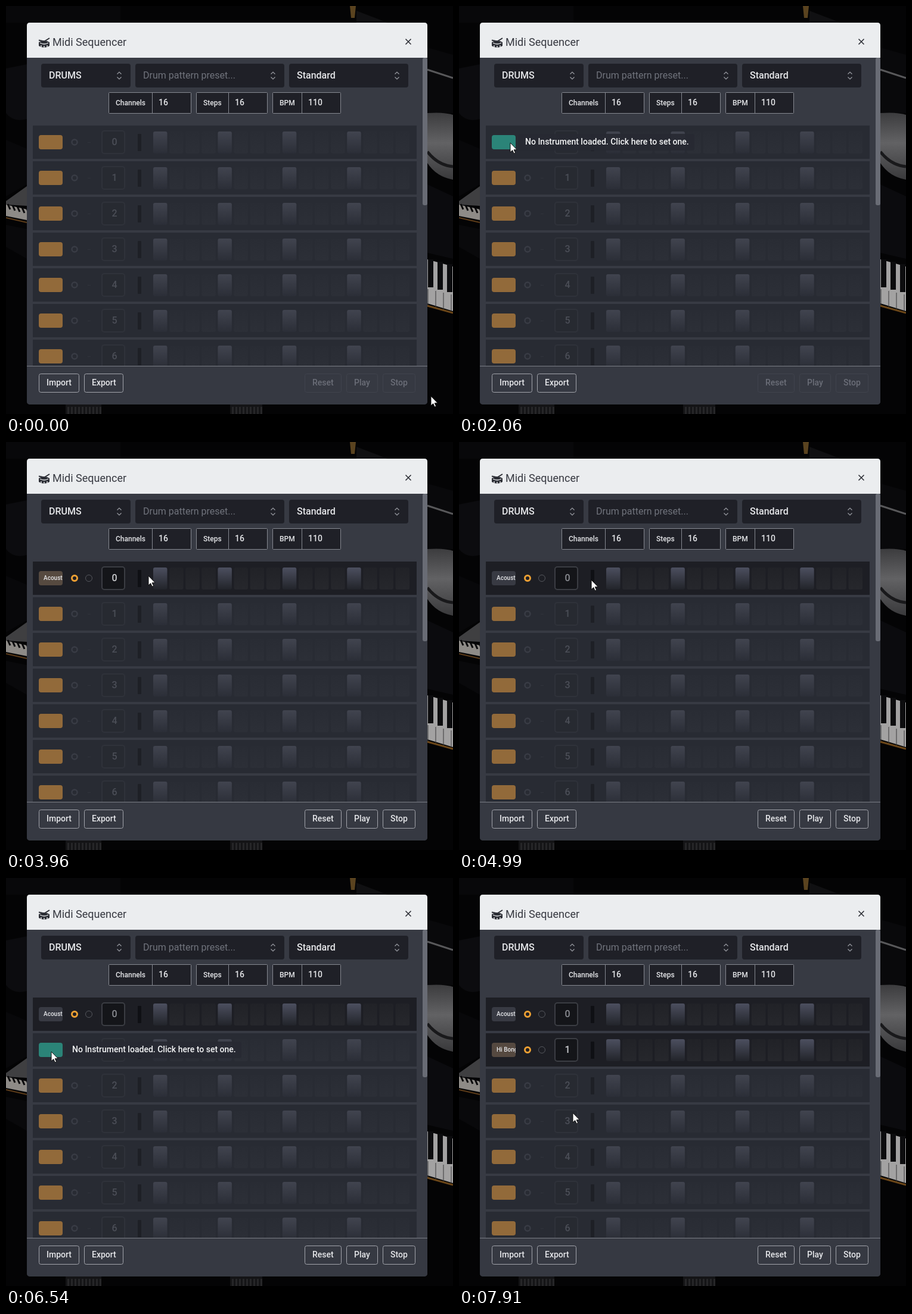
An HTML page that plays this animation: 750x686 px, repeating every 8000 ms.

```html
<!DOCTYPE html>
<html lang="en">
<head>
<meta charset="utf-8">
<title>Midi Sequencer</title>
<style>
html, body { margin: 0; width: 100%; height: 100%; overflow: hidden; background: #040405; }
svg { font-family: Roboto, sans-serif; }
#stage { display: block; width: 100vw; height: 100vh; }
</style>
</head>
<body>
<svg id="stage" viewBox="0 0 750 686">
  <defs>
    <linearGradient id="beatOn" x2="0" y2="1"><stop stop-color="#4c4f5f"/><stop offset="1" stop-color="#22242a"/></linearGradient>
    <linearGradient id="beatOff" x2="0" y2="1"><stop stop-color="#41444f"/><stop offset="1" stop-color="#2b2e37"/></linearGradient>
    <linearGradient id="padOn" x2="0" y2="1"><stop stop-color="#212227"/><stop offset="1" stop-color="#26272c"/></linearGradient>
    <linearGradient id="padOff" x2="0" y2="1"><stop stop-color="#292c34"/><stop offset="1" stop-color="#2c2f37"/></linearGradient>
    <linearGradient id="lamp" x2="0" y2="1"><stop stop-color="#3c3c3e"/><stop offset=".45" stop-color="#626264"/><stop offset="1" stop-color="#39393b"/></linearGradient>
  </defs>
  <g id="room"></g>
  <g id="scene"></g>
</svg>
<script>
const LOOP = 8000, STEP = 172;
const ORANGE = '#926a3a', BODY = '#373a43', HEADER = '#ebedef', INK = '#2c2e35', PALE = '#e6e7ea';
const dialogs = [{ open: 2400, close: 3950, row: 0 }, { open: 6700, close: 7900, row: 1 }];
const labels = ['Acoustic Bass Drum', 'Hi Bongo'];
const instruments = [
  ['Acoustic Bass Drum', 35], ['Ride Cymbal 2', 59], ['Bass Drum 1', 36], ['Hi Bongo', 60],
  ['1 Side Stick', 37], ['3 Low Bongo', 61], ['Acoustic Snare', 38], ['Mute Hi Conga', 62], ['Hand Clap', 39]
];
// Pointer path: time, x, y
const pointerPath = [
  [0, 713, 656], [1200, 716, 490], [1548, 86, 230], [2408, 86, 230], [2920, 231, 229], [3270, 239, 226],
  [3960, 239, 225], [4816, 239, 225], [5676, 76, 292], [6880, 76, 292], [7568, 197, 395], [7910, 191, 395], [8000, 191, 395]
];

const clamp = v => Math.max(0, Math.min(1, v));
const repeat = (n, draw) => Array.from({ length: n }, (_, i) => draw(i)).join('');
const mix = (a, b, k) => `rgb(${a.map((v, i) => Math.round(v + (b[i] - v) * k))})`;
const rect = (x, y, w, h, fill, r = 0, extra = '') =>
  `<rect x="${x}" y="${y}" width="${w}" height="${h}" rx="${r}" fill="${fill}" ${extra}/>`;
const frame = (x, y, w, h, stroke, fill = 'none', r = 3, line = 1) =>
  rect(x + line / 2, y + line / 2, w - line, h - line, fill, r, `stroke="${stroke}" stroke-width="${line}"`);
const text = (x, y, str, size, fill = PALE, weight = 500, extra = '') =>
  `<text x="${x}" y="${y}" font-size="${size}" fill="${fill}" font-weight="${weight}" ${extra}>${str}</text>`;
const line = (d, stroke, width = 1, extra = '') =>
  `<path d="${d}" fill="none" stroke="${stroke}" stroke-width="${width}" ${extra}/>`;
const shape = (d, fill, extra = '') => `<path d="${d}" fill="${fill}" ${extra}/>`;
const ring = (x, y, r, stroke, width, fill = 'none') =>
  `<circle cx="${x}" cy="${y}" r="${r}" fill="${fill}" stroke="${stroke}" stroke-width="${width}"/>`;
const closeIcon = (x, y) => line(`M${x - 4.5} ${y - 4.5}l9 9m0-9l-9 9`, INK, 1.6);

function drawRoom() {
  return rect(0, 0, 750, 686, '#040405') +
    rect(0, 0, 192, 28, '#08080a') +
    shape('M0 105L35 98V190Q12 196 0 180Z', '#0c0c0f') +
    shape('M0 225L35 240V300L0 320Z', '#08080a') +
    shape('M0 328L35 303V336L0 334Z', '#3f3f41') +
    shape('M0 334L35 342V360L0 353Z', '#8e8b87') +
    repeat(5, i => line(`M${3 + i * 8} ${333 + i * 2}l4 9`, '#08080a', 3)) +
    line('M0 356L35 364', '#5c3b18', 2) +
    shape('M0 368L35 375V425L0 405Z', '#09090b') +
    shape('M577 0H587L585 20H579Z', '#5a431f') +
    shape('M588 8L640 28H588Z', '#101012') +
    shape('M707 70L750 82V180H707Z', '#09090b') +
    line('M707 107L750 121', '#58585a', 3) +
    shape('M707 180Q735 178 750 183V292Q722 287 707 264Z', 'url(#lamp)') +
    line('M707 245Q725 268 750 270', '#19191b', 5) +
    shape('M707 300L750 320V425L707 415Z', '#0b0b0e') +
    shape('M707 426L750 438V513L707 500Z', '#a3a2a2') +
    repeat(4, i => line(`M${708 + i * 13} ${476 + i * 3}v28`, '#39393b', 1)) +
    repeat(3, i => rect(708 + i * 16, 426 + i * 4, 9, 47, '#0c0c0e')) +
    line('M707 504L750 516', '#6b4618', 3) +
    [[100, 60], [376, 54]].map(([x, w]) => rect(x, 670, w, 16, '#141416') +
      repeat(w / 6 | 0, i => rect(x + 3 + i * 6, 674, 3, 12, '#262628'))).join('');
}

function select(x, width, label, faint) {
  const arrowX = x + width - 19;
  return rect(x, 97, width, 40, '#1f2027', 4) +
    text(x + 13, 122, label, 16, faint ? '#70737c' : PALE, faint ? 400 : 500) +
    line(`M${arrowX - 3.5} 114.5l3.5-3.5 3.5 3.5m-7 5l3.5 3.5 3.5-3.5`, '#9a9ca3', 1.2);
}

function field(x, width, divider, label, value) {
  return frame(x, 145, width, 36, '#868991', '#1f2027', 1) +
    line(`M${divider + .5} 145v36`, '#868991') +
    text(x + 12, 167, label, 12) + text(divider + 11, 167, value, 14);
}

function button(x, width, label, enabled = true) {
  return frame(x, 618, width, 32, enabled ? '#a3a5ac' : '#40434d') +
    text(x + 13, 638, label, 14, enabled ? PALE : '#6b6e78');
}

function channel(i, t, hovered) {
  const y = 201 + i * 60, dialog = dialogs[i];
  const active = !!dialog && t >= dialog.close;
  const age = active ? t - dialog.close : 0;
  const beat = active ? 'url(#beatOn)' : 'url(#beatOff)', pad = active ? 'url(#padOn)' : 'url(#padOff)';
  const numberColor = active ? mix([205, 207, 210], [138, 140, 146], clamp(age / 500)) : '#4b4e57';
  let out = rect(45, y, 644, 56, active ? '#1d1e24' : '#282b33') +
    frame(160, y + 8, 40, 40, active ? '#3b3d43' : '#2f323a', active ? '#141519' : '#272a31', 4, 2) +
    text(182, y + 33, i, 16, numberColor, 500, 'text-anchor="middle"') +
    rect(221, y + 14, 6, 29, active ? '#0f1014' : '#1e2026', 1) +
    repeat(16, s => rect(247 + s * 27.1, y + 10, 23.5, 37, s % 4 ? pad : beat, 3)) +
    ring(115, y + 28, 4.5, active ? '#eda033' : '#393c45', active ? 3 : 2.5);
  if (active) {
    const fill = mix([146, 106, 58], [56, 58, 67], clamp(.65 + age / 400));
    return out + ring(139, y + 28, 5.5, '#55575d', 1) + rect(55, y + 16, 40, 24, fill, 4) +
      `<svg x="55" y="${y + 16}" width="40" height="24">${text(8, 15, labels[i], 10)}</svg>`;
  }
  out += line(`M137 ${y + 28.5}h5`, '#30333b') + rect(55, y + 16, 40, 24, hovered ? '#2b8478' : ORANGE, 4);
  if (hovered) {
    out += rect(99, y + 14, 296, 28, '#272a32', 4, 'opacity=".9"') +
      text(111, y + 32, 'No Instrument loaded. Click here to set one.', 14, '#f4f5f6');
  }
  return out;
}

function sequencer(t, hoveredRow) {
  const loaded = t >= dialogs[0].close;
  const drum = line('M55 57.5l9 2M73 54l-8 5', INK, 2) +
    shape('M55 61q9-6 18 0v6q-9 6-18 0Z', INK) +
    line('M57 62q7 4 14 0M59 66v3M64 67v3M69 66v3', HEADER, 1.4);
  return rect(35, 28, 672, 642, BODY, 5) +
    shape('M35 87V33q0-5 5-5H702q5 0 5 5V87Z', HEADER) + drum +
    text(78, 67, 'Midi Sequencer', 18, '#363840', 400) + closeIcon(675, 60) +
    select(59, 150, 'DRUMS') + select(217, 250, 'Drum pattern preset...', true) + select(475, 200, 'Standard') +
    field(172, 139, 245, 'Channels', 16) + field(319, 120, 373, 'Steps', 16) + field(447, 115, 496, 'BPM', 110) +
    repeat(7, i => channel(i, t, i === hoveredRow)) +
    rect(699, 87, 8, 248, '#696c75', 3) +
    rect(35, 605, 672, 65, '#363942', 5) + line('M35 605.5H707', '#7b7e86') +
    button(55, 68, 'Import') + button(131, 66, 'Export') +
    button(501, 62, 'Reset', loaded) + button(571, 53, 'Play', loaded) + button(632, 55, 'Stop', loaded);
}

function instrumentDialog(hoveredRow) {
  const notes = line('M141 56V46l11-3v10', INK, 2) + shape('M140 45l13-4v4l-13 4Z', INK) +
    `<ellipse cx="138.500" cy="57" rx="3.500" ry="3" fill="${INK}"/><ellipse cx="149.500" cy="54" rx="3.500" ry="3" fill="${INK}"/>`;
  const heading = (x, label) => ring(x, 165, 4.4, '#d9dadd', 1.2, '#15161a') +
    line(`M${x - 2} 163.500l2 1.500h2`, '#d9dadd') + text(x + 11, 171.5, label, 12.8, PALE, 700);
  return `<svg x="115" y="20" width="512" height="659" viewBox="115 20 512 659">` +
    rect(115, 20, 512, 664, BODY, 5) + shape('M115 79V25q0-5 5-5H622q5 0 5 5V79Z', HEADER) + notes +
    text(158, 59, 'Percussion Keys', 18, '#363840', 400) + closeIcon(595, 60) +
    frame(135, 87, 464, 40, '#8a8d95') + text(148, 112, 'Search for instruments...', 16, '#70737c', 400) +
    heading(165, 'NAME') + heading(483, 'KEY') +
    instruments.map(([name, key], i) => {
      const y = 189 + i * 57;
      return (i === hoveredRow ? rect(135, y, 464, 56, '#26282e') : '') +
        line(`M135 ${y - .5}H599`, '#2e3138') + text(159, y + 33, name, 16) + text(477.5, y + 33, key, 16);
    }).join('') +
    rect(619, 79, 8, 129, '#6f727b', 3) + '</svg>';
}

function pointerAt(t) {
  const n = pointerPath.findIndex(p => p[0] > t);
  const [t0, x0, y0] = pointerPath[n - 1], [t1, x1, y1] = pointerPath[n];
  const k = (t - t0) / (t1 - t0), ease = k * k * (3 - 2 * k);
  return [x0 + (x1 - x0) * ease, y0 + (y1 - y0) * ease];
}

function cursor(x, y, hand) {
  const d = hand
    ? 'M-2.200 1.500a2.200 2.200 0 0 1 4.400 0V7.500l5.500 1.500q2 .6 1.800 3l-1 6.500-1.500 4.500H-1.500L-7 15q-1.500-2.500 .5-3 1.600-.3 4.300 2.600Z'
    : 'M0 0V16L3.700 12.600 6.200 18 8.600 17 6.200 11.700H11.300Z';
  return `<g transform="translate(${x} ${y})">${shape(d, '#fff', 'stroke="#111" stroke-width="1"')}` +
    (hand ? line('M2 8v4M5 9v3.500', '#111', .8) : '') + '</g>';
}

function scene(t) {
  const [x, y] = pointerAt(t);
  const dialog = dialogs.find(d => t >= d.open && t < d.close);
  const busy = dialogs.some(d => t >= d.open - 360 && t < d.open);
  const row = Math.floor((y - 201) / 60), rowY = y - 201 - row * 60;
  const onButton = !dialog && x >= 55 && x <= 95 && row >= 0 && row < 7 && rowY >= 16 && rowY <= 40;
  const item = dialog && x >= 135 && x <= 599 && y >= 189 ? Math.floor((y - 189) / 57) : -1;
  const shown = dialog ? clamp((t - dialog.open + 100) / 300) : 0;
  return sequencer(t, onButton ? row : -1) +
    (dialog ? rect(0, 0, 750, 686, '#000', 0, `opacity="${.6 * shown}"`) +
      `<g opacity="${shown}">${instrumentDialog(item)}</g>` : '') +
    cursor(x, y, !busy && (onButton || item >= 0));
}

const sceneGroup = document.getElementById('scene');
document.getElementById('room').innerHTML = drawRoom();
const start = performance.now();
let lastTick = -1;

function render() {
  const t = (performance.now() - start) % LOOP;
  const tick = Math.floor((t + 10) / STEP);
  if (tick !== lastTick) {
    lastTick = tick;
    sceneGroup.innerHTML = scene(Math.min(tick * STEP, LOOP - 1));
  }
  requestAnimationFrame(render);
}
render();
</script>
</body>
</html>
```
